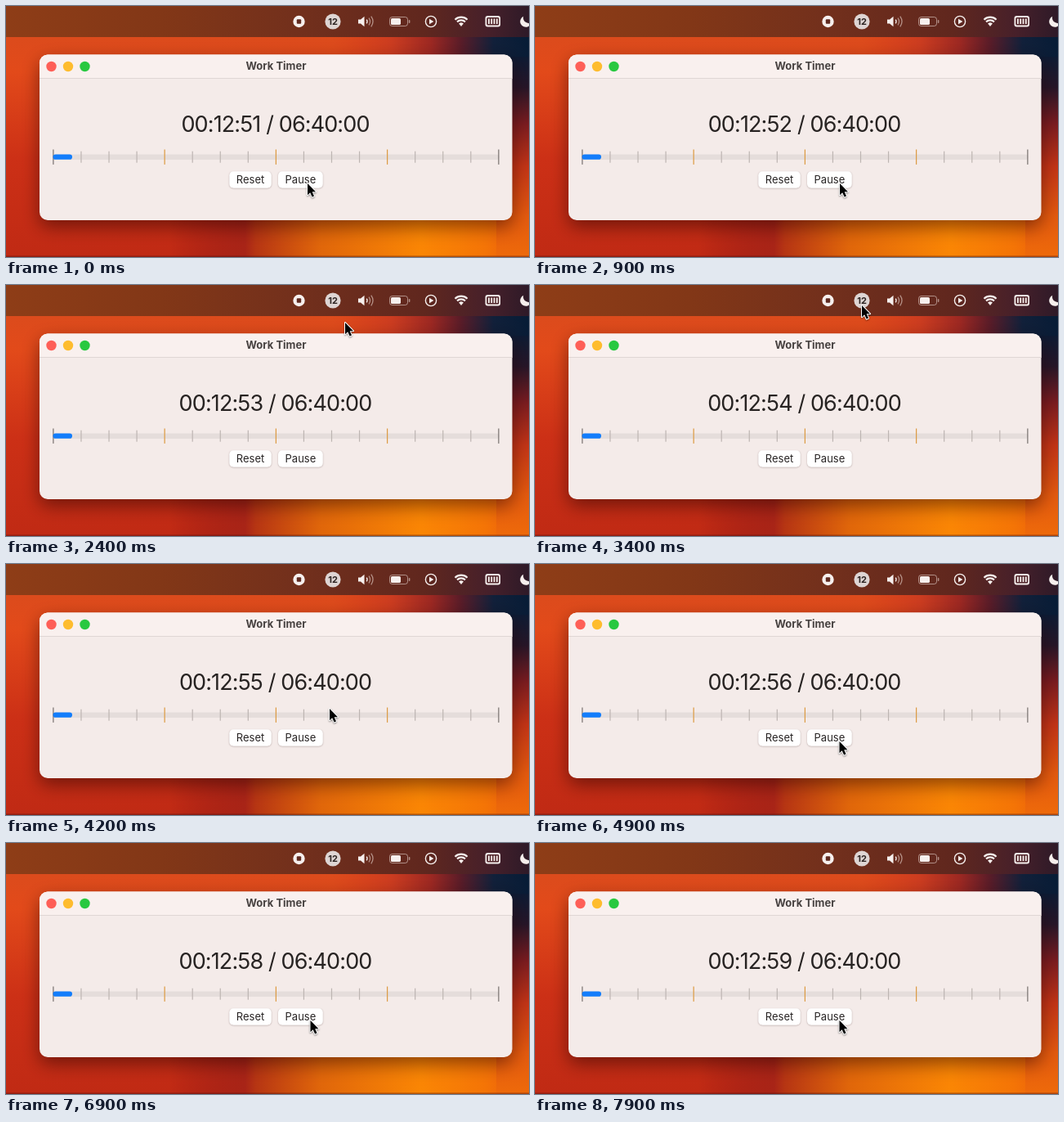
An HTML page with a canvas for the animation above (8000 ms loop, 640 by 307 pixels).

```html
<!DOCTYPE html>
<html lang="en">
<head>
<meta charset="utf-8">
<title>Work Timer</title>
<style>
html, body { margin: 0; width: 100%; height: 100%; overflow: hidden; background: #b92d16; }
canvas { display: block; width: 640px; height: 307px; }
</style>
</head>
<body>
<canvas id="stage"></canvas>
<script>
const W = 640, H = 307, LOOP = 8000, FRAME = 100;
const FONT = 'Inter, "Noto Sans", sans-serif';
const canvas = document.getElementById('stage');
const ctx = canvas.getContext('2d');
const scale = window.devicePixelRatio || 1;
canvas.width = Math.round(W * scale);
canvas.height = Math.round(H * scale);
ctx.scale(scale, scale);

// Pointer tip: time, x, y
const POINTER = [
  [0, 369, 217], [100, 371, 217], [200, 373, 217], [1400, 373, 217],
  [2100, 415, 46], [2400, 415, 46], [2900, 400, 25], [3800, 400, 25],
  [4000, 400, 62], [4100, 399, 115], [4200, 396, 177],
  [4400, 381, 211], [4600, 372.5, 217], [8000, 372.5, 217]
];

function pointerAt(t) {
  const i = POINTER.findIndex(key => key[0] > t);
  const [t0, x0, y0] = POINTER[i - 1], [t1, x1, y1] = POINTER[i];
  const p = (t - t0) / (t1 - t0);
  const k = t1 - t0 > 300 ? p * p * (3 - 2 * p) : p;
  return [x0 + (x1 - x0) * k, y0 + (y1 - y0) * k];
}

function addStops(gradient, stops) {
  stops.forEach(([at, color]) => gradient.addColorStop(at, color));
  return gradient;
}
const linear = (x0, y0, x1, y1, stops) => addStops(ctx.createLinearGradient(x0, y0, x1, y1), stops);
const radial = (x, y, r, stops) => addStops(ctx.createRadialGradient(x, y, 0, x, y, r), stops);

function rect(x, y, w, h, color) {
  ctx.fillStyle = color;
  ctx.fillRect(x, y, w, h);
}
function roundRect(x, y, w, h, r, color) {
  ctx.beginPath();
  ctx.roundRect(x, y, w, h, r);
  ctx.fillStyle = color;
  ctx.fill();
}
function disc(x, y, r, color) {
  ctx.beginPath();
  ctx.arc(x, y, r, 0, 7);
  ctx.fillStyle = color;
  ctx.fill();
}
function polygon(points, color) {
  ctx.beginPath();
  points.forEach(([x, y]) => ctx.lineTo(x, y));
  ctx.closePath();
  ctx.fillStyle = color;
  ctx.fill();
}
function arc(x, y, r, from, to, width, color) {
  ctx.beginPath();
  ctx.arc(x, y, r, from, to);
  ctx.lineWidth = width;
  ctx.strokeStyle = color;
  ctx.stroke();
}
function label(text, x, y, size, weight, color, spacing = 0) {
  ctx.font = `${weight} ${size}px ${FONT}`;
  ctx.letterSpacing = spacing + 'px';
  ctx.textAlign = 'center';
  ctx.fillStyle = color;
  ctx.fillText(text, x, y);
}
function withShadow(color, blur, dy, draw) {
  ctx.save();
  ctx.shadowColor = color;
  ctx.shadowBlur = blur * scale;
  ctx.shadowOffsetY = dy * scale;
  draw();
  ctx.restore();
}

function drawWallpaper() {
  rect(0, 0, W, H, linear(0, 40, 0, H, [[0, '#dc4b1c'], [.15, '#e24a1a'], [.55, '#cc3016'], [1, '#c02a14']]));
  rect(200, 200, 440, 107, linear(200, 0, 640, 0, [
    [0, 'rgba(150,26,20,0)'], [.21, '#a82417'], [.24, '#b63513'], [.42, '#e0660a'],
    [.7, '#fa8604'], [.88, '#f47406'], [1, '#e6570e']
  ]));
  rect(600, 38, 40, 269, linear(0, 60, 0, H, [
    [0, '#0b1b34'], [.16, '#261628'], [.34, '#7a1c20'], [.55, '#c23416'], [.8, '#e35a0e'], [1, '#ee6a0a']
  ]));
  rect(400, 38, 240, 24, linear(400, 0, 640, 0, [
    [0, 'rgba(214,60,26,0)'], [.3, '#cb3c20'], [.5, '#9c2822'], [.65, '#5a1c28'], [.82, '#10203a'], [1, '#071c36']
  ]));
  rect(0, 305.5, W, 1.5, 'rgba(70,10,10,.4)');
  rect(0, 0, W, 38, linear(0, 0, W, 0, [
    [0, '#8e3d17'], [.3, '#823717'], [.55, '#73301c'], [.8, '#60271e'], [.92, '#47202a'], [1, '#2e1a28']
  ]));
}

function drawMenuIcons() {
  const white = '#f6efed', dim = 'rgba(255,245,240,.5)', dark = '#602a20';
  disc(358.5, 19, 7.2, white);
  roundRect(355.8, 16.3, 5.4, 5.4, 1, dark);

  disc(400, 19, 9.6, '#ded5d3');
  label('12', 400, 23, 11, 700, '#2d2422');

  polygon([[431, 16.5], [434, 16.5], [438.5, 12.8], [438.5, 25.2], [434, 21.5], [431, 21.5]], white);
  [4, 7.4, 10.8].forEach((r, i) => arc(438, 19, r, -.62, .62, 1.3, i < 1 ? white : dim));

  ctx.beginPath();
  ctx.roundRect(469.5, 13.5, 22, 11, 3);
  ctx.lineWidth = 1;
  ctx.strokeStyle = dim;
  ctx.stroke();
  roundRect(471, 15, 12, 8, 1.6, white);
  roundRect(492.8, 17, 1.6, 4, 1, dim);

  arc(520, 19, 6.6, 0, 7, 1.4, white);
  polygon([[518, 15.8], [523.4, 19], [518, 22.2]], white);

  const up = -Math.PI / 2, spread = .76;
  [10.9, 7.2].forEach(r => arc(557, 24.6, r, up - spread, up + spread, 2.2, white));
  ctx.beginPath();
  ctx.moveTo(557, 25);
  ctx.arc(557, 24.6, 4.2, up - spread, up + spread);
  ctx.fillStyle = white;
  ctx.fill();

  roundRect(586.5, 12, 18.5, 13.5, 3, white);
  roundRect(588.3, 14, 15, 9.5, 1.5, '#50242a');
  for (let i = 0; i < 4; i++) rect(590 + i * 3.3, 15.5, 1.8, 6.5, white);

  ctx.beginPath();
  ctx.arc(636, 19, 6.8, -2, .35, true);
  ctx.quadraticCurveTo(631.5, 21, 633.2, 12.8);
  ctx.fillStyle = white;
  ctx.fill();
}

function drawWindow() {
  withShadow('rgba(30,0,0,.5)', 22, 8, () => roundRect(41, 59.5, 578.5, 202.5, 10, '#f4ebe9'));
  roundRect(41, 59.5, 578.5, 29, [10, 10, 0, 0], '#f9f0ee');
  rect(41, 88, 578.5, 1, '#e0d7d5');
  ['#fe5f57', '#febc2e', '#28c840'].forEach((color, i) => disc(55.5 + i * 20.5, 74, 6.2, color));
  label('Work Timer', 330.5, 78, 13, 700, '#474241');
}

function drawScale() {
  roundRect(57.5, 181.5, 546, 6.5, 3.2, '#e5dddb');
  for (let i = 0; i <= 16; i++) {
    const end = i % 16 === 0, major = i % 4 === 0;
    const color = end ? '#77706e' : major ? '#dc9a42' : '#bdb5b2';
    const half = major ? 9.2 : 7;
    rect(57.3 + i * 34.06, 184.7 - half, 1.2, half * 2, color);
  }
  roundRect(57.5, 181.5, 23.5, 6.3, 3.1, '#137dfb');
}

function drawButton(text, x, width) {
  withShadow('rgba(60,30,30,.35)', 2, .6, () => roundRect(x, 202.3, width, 20.4, 5, '#fff'));
  label(text, x + width / 2, 216.7, 13, 400, '#282424');
}

function drawPointer(x, y) {
  ctx.save();
  ctx.translate(x, y);
  ctx.lineJoin = 'round';
  const shape = [[0, 0], [0, 14.2], [3.2, 11.2], [5.6, 16.6], [8, 15.6], [5.7, 10.3], [10, 10.2]];
  withShadow('rgba(0,0,0,.35)', 2, 1, () => {
    polygon(shape, '#000');
    ctx.lineWidth = 2;
    ctx.strokeStyle = '#fff';
    ctx.stroke();
  });
  polygon(shape, '#000');
  ctx.restore();
}

function draw(t) {
  drawWallpaper();
  drawMenuIcons();
  drawWindow();
  const seconds = 51 + Math.floor((t + 100) / 1000);
  label(`00:12:${seconds} / 06:40:00`, 329.5, 153.5, 27, 400, '#272322', -.88);
  drawScale();
  drawButton('Reset', 273.3, 51.5);
  drawButton('Pause', 333, 54.8);
  drawPointer(...pointerAt(t));
}

const start = performance.now();
function tick() {
  const t = (performance.now() - start) % LOOP;
  draw(Math.floor(t / FRAME) * FRAME);
  requestAnimationFrame(tick);
}
tick();
</script>
</body>
</html>
```
